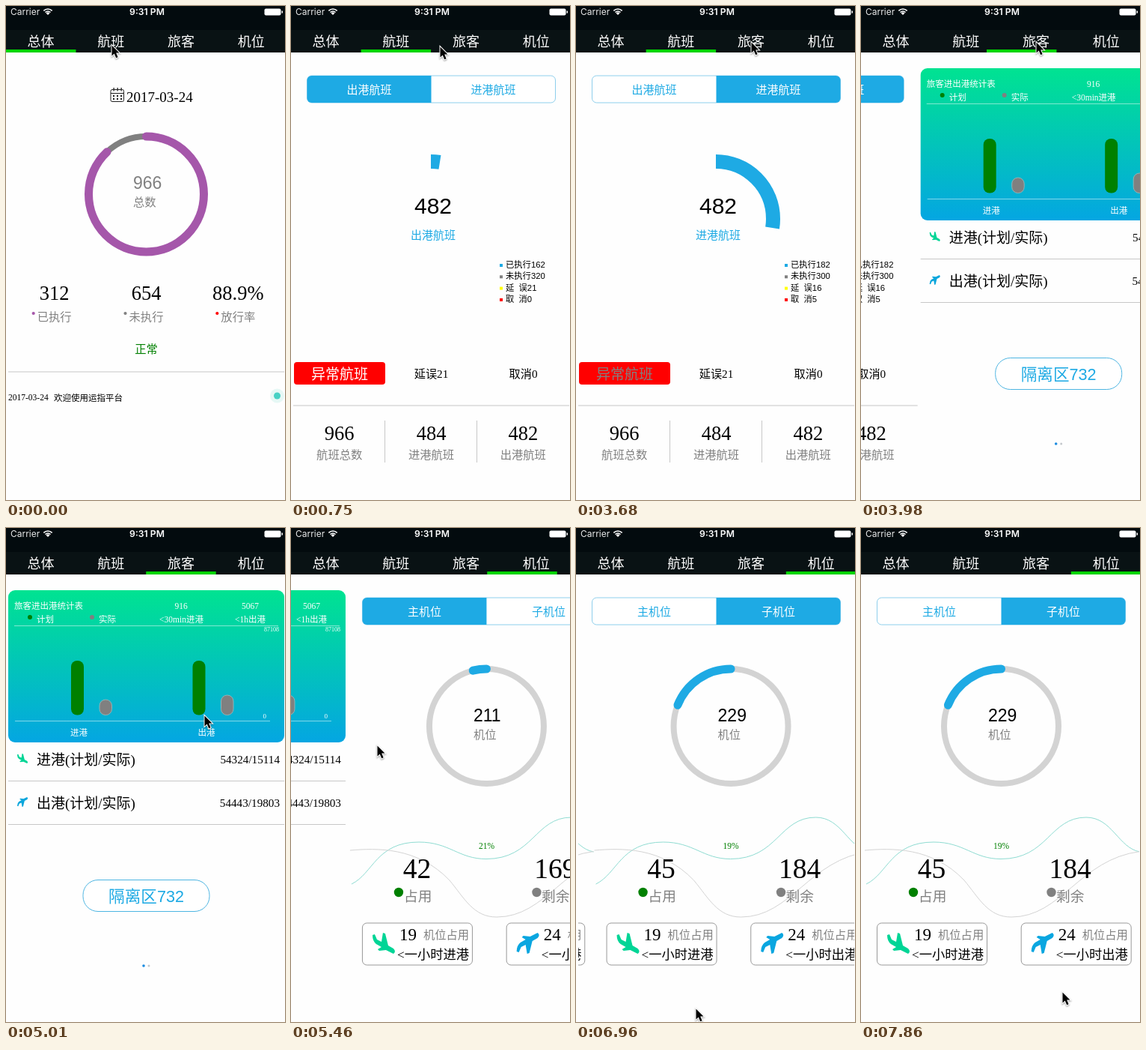
Animation, 373 px wide and 659 px high, one loop 8000 ms. Source, as an HTML page with a canvas:

```html
<!DOCTYPE html>
<html lang="zh">
<head>
<meta charset="utf-8">
<style>
  html, body { margin: 0; width: 100%; height: 100%; overflow: hidden; background: #fff; }
  canvas { display: block; }
</style>
</head>
<body>
<canvas id="stage" width="373" height="659"></canvas>
<script>
const c = document.getElementById('stage').getContext('2d');
const W = 373, H = 659, LOOP = 8000, TICK = 148, LAST = 53;
const CJK = '"Noto Sans CJK SC", "Noto Sans CJK", sans-serif';
const SERIF = '"Liberation Serif", ' + CJK.replace('sans-serif', 'serif');
const ARIAL = '"Liberation Sans", ' + CJK;
const UI = 'Inter, sans-serif';
const BLUE = '#1eaae4', GRAY = '#808080', GREEN = '#008000', LINE = '#c8c8c8';

// Cursor tip: tick, x, y
const CURSOR = [
  [2, 141, 52], [3, 152, 53], [5, 199, 54], [8, 245, 85], [10, 266, 112], [12, 264, 116],
  [15, 234, 257], [18, 230, 235], [23, 240, 24], [25, 234, 48], [27, 234, 48],
  [34, 265, 250], [35, 252, 262], [37, 115, 290], [38, 120, 330], [41, 247, 587],
  [42, 255, 600], [43, 255, 600], [44, 98, 583], [45, 90, 590], [47, 160, 641],
  [50, 267, 628], [53, 269, 619]
];

const clamp = v => Math.max(0, Math.min(1, v));
const ease = (n, start, length) => {
  const p = clamp((n - start) / length);
  return p * p * (3 - 2 * p);
};

// y is the visual middle of the glyphs
function text(s, x, y, size, color = '#000', font = CJK, align = 'center', weight = 400) {
  c.font = `${weight} ${size}px ${font}`;
  c.textAlign = align;
  c.fillStyle = color;
  const drop = font === SERIF ? .345 : font === CJK ? .38 : .36;
  c.fillText(s, x, y + size * drop);
}

function box(x, y, w, h, r, fill, stroke) {
  c.beginPath();
  c.roundRect(x, y, w, h, r);
  if (fill) { c.fillStyle = fill; c.fill(); }
  if (stroke) { c.strokeStyle = stroke; c.lineWidth = 1; c.stroke(); }
}

function dot(x, y, r, color) {
  c.beginPath();
  c.arc(x, y, r, 0, 7);
  c.fillStyle = color;
  c.fill();
}

// Angles in degrees, clockwise from the top
function arc(x, y, r, from, to, width, color, cap = 'butt') {
  const rad = a => (a - 90) * Math.PI / 180;
  c.beginPath();
  c.arc(x, y, r, rad(from), rad(to));
  c.lineWidth = width;
  c.lineCap = cap;
  c.strokeStyle = color;
  c.stroke();
  c.lineCap = 'butt';
}

function rect(x, y, w, h, color) {
  c.fillStyle = color;
  c.fillRect(x, y, w, h);
}

function curve(d, color) {
  c.strokeStyle = color;
  c.lineWidth = 1;
  c.stroke(new Path2D(d));
}

function shifted(dx, draw) {
  c.save();
  c.translate(dx, 0);
  draw();
  c.restore();
}

// Two side-by-side panels sliding below a segmented control
function panels(progress, draw) {
  c.save();
  c.beginPath();
  c.rect(3, 132, 369, H);
  c.clip();
  [0, 1].forEach(i => {
    const dx = (i - progress) * 369;
    if (Math.abs(dx) < 369) shifted(dx, () => draw(i));
  });
  c.restore();
}

function segments(labels, active) {
  box(21.5, 93, 332, 36, 6, '#fff', '#8ecfec');
  box(active ? 187.5 : 21.5, 93, 166, 36, active ? [0, 6, 6, 0] : [6, 0, 0, 6], BLUE);
  labels.forEach((s, i) => text(s, 104.5 + i * 166, 111, 15, i === active ? '#fff' : BLUE));
}

function plane(x, y, scale, color, rising) {
  c.save();
  c.translate(x, y);
  c.scale(scale, rising ? -scale : scale);
  c.fillStyle = color;
  c.fill(new Path2D('M-15-11 L-12-12 L-9-5 L-3-2 L-1-14 L2-13 L6 3 L13 7 Q17 11 13 14 ' +
    'L3 9 L-6 10 L-8 8 L-3 5 L-10 1 Q-15-3-15-11Z'));
  c.restore();
}

function overview() {
  box(140, 111.5, 17.5, 16, 2, null, '#222');
  rect(140, 116, 17.5, 1, '#222');
  [144, 149, 154].forEach(x => {
    rect(x - .5, 109, 1.3, 4.5, '#222');
    rect(x - 1, 119, 2, 2, '#222');
    rect(x - 1, 123, 2, 2, '#222');
  });
  text('2017-03-24', 161, 121, 19, '#000', SERIF, 'left');

  arc(187.5, 251, 77, 317, 360, 8, GRAY);
  arc(187.5, 251, 77, 0, 317, 11, '#a557aa', 'round');
  text('966', 170, 236, 23, GRAY, ARIAL, 'left');
  text('总数', 170, 261, 15.3, GRAY, CJK, 'left');

  [['312', '已执行', '#a557aa'], ['654', '未执行', GRAY], ['88.9%', '放行率', '#f00']]
    .forEach(([value, label, color], i) => {
      const x = 64.7 + i * 122.8;
      text(value, x, 383, 26.5, '#000', SERIF);
      text(label, x, 414.5, 15.3, GRAY);
      dot(x - 28, 410, 2.1, color);
    });
  text('正常', 187.5, 457, 15.3, GREEN);
  rect(3, 487.5, 369, 1, LINE);
  text('2017-03-24', 3, 522.5, 11.5, '#000', SERIF, 'left');
  text('欢迎使用运指平台', 64, 522.5, 11.5, '#000', CJK, 'left');
  dot(362.5, 520, 9.5, '#e6f8f5');
  dot(362.5, 520, 4.5, '#48d1c4');
}

function flights(n) {
  const slide = ease(n, 10.5, 2.4);
  const names = ['出港航班', '进港航班'];
  segments(names, slide > .5 ? 1 : 0);
  panels(slide, i => {
    arc(187, 284, 76.5, 0, Math.max(0, 9 + (n - 5) * 4.5), 19, BLUE);
    text('482', 190, 266, 30, '#000', ARIAL);
    text(names[i], 190, 305.5, 15, BLUE);
    const counts = i ? [182, 300, 16, 5] : [162, 320, 21, 0];
    ['已执行', '未执行', '延  误', '取  消'].forEach((s, k) => {
      const y = 345 + k * 15.3;
      rect(279, y - 1, 4, 4, [BLUE, GRAY, '#ff0', '#f00'][k]);
      text(s + counts[k], 287, y, 11.3, '#000', ARIAL, 'left');
    });
  });

  const dim = Math.floor((n * TICK - 450) / 1000) % 2 === 1;
  box(4, 475, 122, 30, 4, '#f00');
  text('异常航班', 65, 490.5, 19, dim ? GRAY : '#fff');
  text('延误21', 187.5, 490.5, 15.2, '#000', SERIF);
  text('取消0', 310.5, 490.5, 15.2, '#000', SERIF);
  rect(3, 532.5, 369, 1, LINE);
  rect(125, 553, 1, 56, LINE);
  rect(248, 553, 1, 56, LINE);
  [['966', '航班总数'], ['484', '进港航班'], ['482', '出港航班']].forEach(([value, label], i) => {
    text(value, 64.7 + i * 122.8, 570, 26.5, '#000', SERIF);
    text(label, 64.7 + i * 122.8, 598, 15.3, GRAY);
  });
}

function passengers() {
  const sky = c.createLinearGradient(0, 83, 0, 286);
  sky.addColorStop(0, '#00e391');
  sky.addColorStop(1, '#04a6e2');
  box(3, 83, 369, 203, 9, sky);
  const label = (s, x, y, align, size = 11.5) => text(s, x, y, size, '#fff', SERIF, align);
  label('旅客进出港统计表', 11, 104.5, 'left');
  label('916', 234, 104.5);
  label('5067', 326.5, 104.5);
  dot(32, 119, 3, GREEN);
  label('计划', 41, 122, 'left');
  dot(115, 119, 3, GRAY);
  label('实际', 124, 122, 'left');
  label('<30min进港', 234.5, 122);
  label('<1h出港', 326.5, 122);
  rect(11, 130, 353, 1, '#ffffff80');
  label('87108', 365, 135.5, 'right', 8);
  rect(12, 257, 341, 1, '#ffffff80');
  label('0', 348, 250.5, 'right', 9);
  [[87, 20.5], [249.5, 26.5]].forEach(([x, h]) => {
    box(x, 177, 17, 72.5, 8, GREEN);
    box(x + 38, 249.5 - h, 16.5, h, 8, GRAY, '#8fb5b8');
  });
  label('进港', 97.5, 273.5);
  label('出港', 268, 273.5);

  [['进港', '54324/15114', '#00d596'], ['出港', '54443/19803', '#0aa6dc']]
    .forEach(([name, value, color], i) => {
      const y = 309 + i * 58;
      plane(22, y - 1.5, .47, color, i);
      text(name + '(计划/实际)', 41, y, 19, '#000', SERIF, 'left');
      text(value, 366, y, 15.2, '#000', SERIF, 'right');
      rect(3, y + 28, 369, 1, LINE);
    });
  box(103, 469.5, 169, 42, 20, '#fff', '#4db5e2');
  text('隔离区732', 187.5, 491, 21.6, BLUE, ARIAL);
  dot(184, 584, 1.8, '#1a8be0');
  dot(191, 584, 1.5, '#c4c8cc');
}

function bays(n) {
  const slide = n < 44 ? 0 : n === 44 ? 16 / 369 : 16 / 369 + (1 - 16 / 369) * ease(n, 44, 3.5);
  segments(['主机位', '子机位'], slide > .5 ? 1 : 0);
  panels(slide, i => {
    const [total, share, used, left] = i ? ['229', 19, '45', '184'] : ['211', 21, '42', '169'];
    arc(187.5, 264.5, 76.5, 0, 360, 8, '#d3d3d3');
    const sweep = share * 3.6 * ease(n, 35.5, 5.5);
    if (sweep) arc(187.5, 264.5, 76.5, -sweep, 0, 11, BLUE, 'round');
    text(total, 170, 249.5, 23, '#000', ARIAL, 'left');
    text('机位', 170, 275, 15.3, GRAY, CJK, 'left');

    curve('M7 475 C36 461 40 419 97 419 C138 419 150 441.5 187 441.5 ' +
      'C250 441.5 252 386 301 386 C336 386 344 427 373 432', '#8fdcd2');
    curve('M5 430 C40 427 95 425 138 470 C158 494 170 519 201 519 C268 519 292 442 373 431.5', '#d4d4d4');
    text(share + '%', 187.5, 424, 11.5, GREEN, SERIF);

    text(used, 94.5, 454.5, 37.5, '#000', SERIF);
    text(left, 279.5, 454.5, 37.5, '#000', SERIF);
    dot(70, 486, 6.2, GREEN);
    dot(254.5, 486, 6.2, GRAY);
    text('占用', 77, 490.5, 18.7, GRAY, CJK, 'left');
    text('剩余', 261, 490.5, 18.7, GRAY, CJK, 'left');

    [['19', '进', '#00d596'], ['24', '出', '#0aa6e0']].forEach(([count, way, color], k) => {
      shifted(k * 192.7, () => {
        box(21.5, 527, 147, 56, 6, '#fff', '#999');
        plane(50, 554, 1, color, k);
        text(count, 71, 542.5, 23, '#000', SERIF, 'left');
        text('机位占用', 103, 542.5, 15.3, GRAY, CJK, 'left');
        text(`<一小时${way}港`, 68, 569.5, 17.25, '#000', SERIF, 'left');
      });
    });
  });
}

function header(pos) {
  rect(0, 0, W, 32, '#030b0e');
  rect(0, 32, W, 30, '#091214');
  text('Carrier', 6, 8, 12, '#e8e8e8', UI, 'left');
  text('9:31 PM', 188.5, 8, 12.2, '#fff', UI, 'center', 600);
  [[2, 3], [5, 1.6], [8, 1.6]].forEach(([r, w]) => arc(56, 12, r, -45, 45, w, '#fff'));
  box(345.5, 3.5, 22, 9, 2, '#fff');
  rect(368.5, 6.5, 1.5, 3, '#fff');
  ['总体', '航班', '旅客', '机位'].forEach((s, i) => text(s, 46.6 + i * 93.7, 47.5, 18, '#fff'));
  rect(pos * 93.6, 58, 93.5, 4, '#00d400');
}

function cursor(n) {
  const k = CURSOR.findIndex(p => p[0] >= n);
  const b = CURSOR[k], a = CURSOR[Math.max(0, k - 1)];
  const p = a === b ? 0 : (n - a[0]) / (b[0] - a[0]);
  c.save();
  c.translate(a[1] + (b[1] - a[1]) * p, a[2] + (b[2] - a[2]) * p);
  const arrow = new Path2D('M.5.5V14.5L3.7 11.5L6.2 17.3L8.6 16.2L6.2 10.6H10.5Z');
  c.shadowColor = '#0006';
  c.shadowBlur = 2;
  c.shadowOffsetY = 1;
  c.lineWidth = 2;
  c.strokeStyle = '#fff';
  c.stroke(arrow);
  c.shadowColor = 'transparent';
  c.fillStyle = '#000';
  c.fill(arrow);
  c.restore();
}

const pages = [overview, flights, passengers, bays];

function frame() {
  const n = Math.min(LAST, Math.floor((performance.now() % LOOP + 26) / TICK));
  const pos = ease(n, 2.4, 2.3) + ease(n, 25.3, 2.4) + ease(n, 34.5, 3.5);
  rect(0, 0, W, H, '#fefefe');
  pages.forEach((draw, i) => {
    if (Math.abs(i - pos) < 1) shifted((i - pos) * W, () => draw(n));
  });
  header(pos);
  cursor(n);
  requestAnimationFrame(frame);
}
frame();
</script>
</body>
</html>
```
